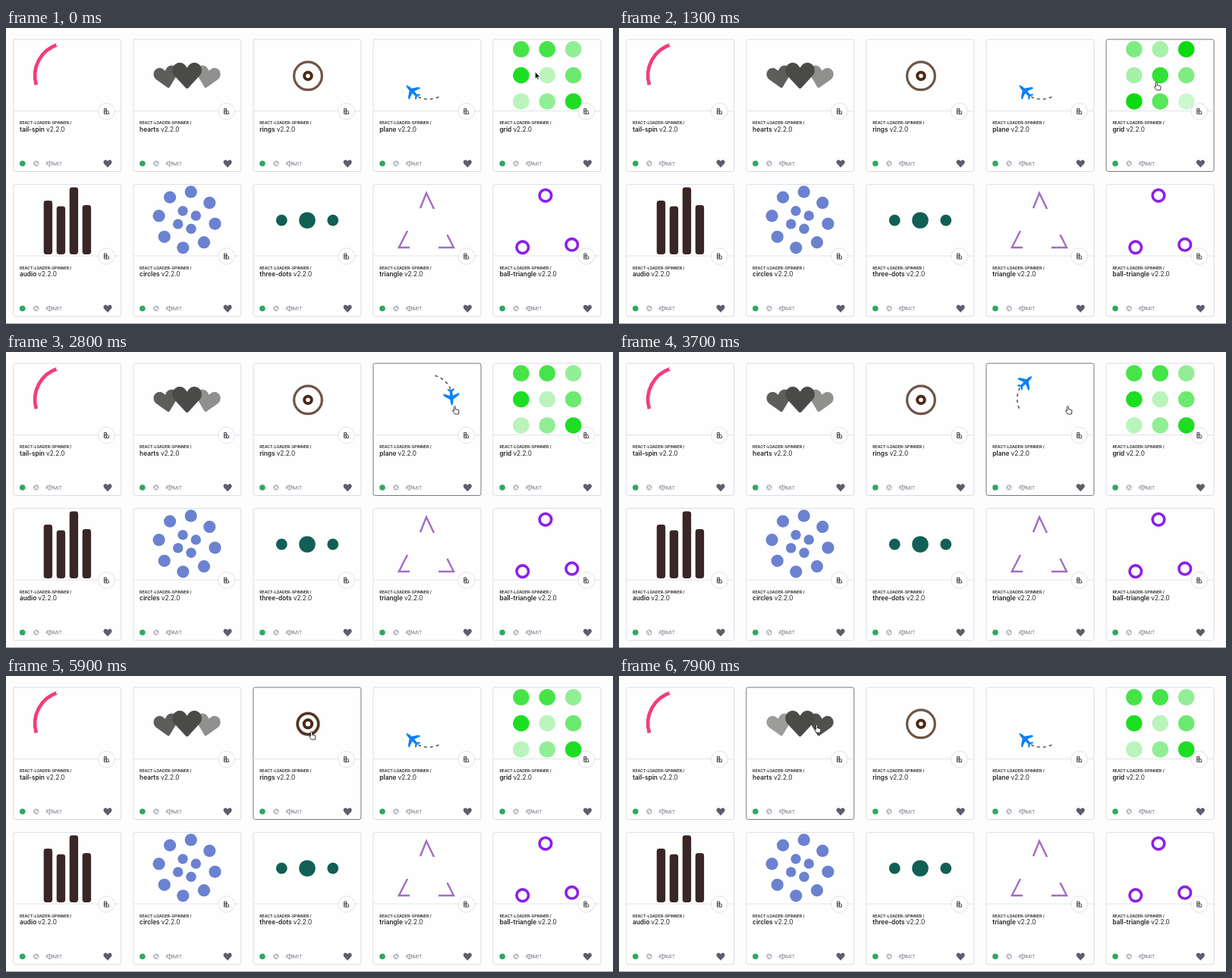
An HTML page for the animation above (8 s loop, 800 by 391 pixels).

```html
<!DOCTYPE html>
<html lang="en">
<head>
<meta charset="utf-8">
<title>Loader gallery</title>
<style>
html, body { margin: 0; width: 100%; height: 100%; overflow: hidden; background: #fdfdfd; }
svg { display: block; }
text { font-family: Inter, "Open Sans", sans-serif; fill: #25252b; }
.pkg { font-size: 5.2px; font-weight: 600; }
.name { font-size: 8.3px; font-weight: 600; }
.name tspan { font-weight: 400; }
.mit { font-size: 6.7px; fill: #7d7d8c; }
.frame { fill: #fefefe; stroke: #dcdce6; }
.hover .frame { stroke: #777783; }
.line { fill: none; stroke: #8b8b99; stroke-width: .8; }
</style>
</head>
<body>
<svg width="800" height="391" viewBox="0 0 800 391">
  <defs>
    <g id="info">
      <path d="M0 94.5H142" stroke="#e1e1ea"/>
      <circle cx="122.7" cy="95" r="10.8" fill="#fff" stroke="#e1e1ea"/>
      <path transform="translate(122.7 95)" fill="none" stroke="#35353c" stroke-width=".9"
        d="M-3 3.5V-3.5H0V3.5ZM0 -1.5L3 .5V3.5H0M-3 -1H0M-3 1H0"/>
      <text class="pkg" x="8.3" y="112">REACT-LOADER-SPINNER /</text>
      <circle cx="12" cy="164" r="3.8" fill="#2fa85f"/>
      <g class="line">
        <circle cx="30" cy="164" r="3.2"/>
        <path d="M27 163l2 1 1 2.8M30 161l1 2 2 .5"/>
        <path d="M47.7 160.5V167M45.5 167h4.4M44.5 161.8h6.4M44.5 162l-1.5 3h3zM50.9 162l-1.5 3h3z"/>
      </g>
      <text class="mit" x="52.2" y="166.6">MIT</text>
      <path fill="#5d5d6b" d="M124.3 169.3L119.7 164.6C116.7 161 121.5 157 124.3 161C127.1 157 131.9 161 128.9 164.6Z"/>
    </g>
    <path id="side" d="M30.262 57.02L7.195 40.723c-5.84-3.976-7.56-12.06-3.842-18.063 3.715-6 11.467-7.65 17.306-3.68l4.52 3.76 2.6-5.274c3.717-6.002 11.47-7.65 17.305-3.68 5.84 3.97 7.56 12.054 3.842 18.062L34.49 56.118c-.897 1.512-2.793 1.915-4.228.9z"/>
  </defs>

  <g id="cards"></g>

  <path d="M39.9 75.1A43 43 0 0 1 67.8 21.9" fill="none" stroke="#f23d7f" stroke-width="4.7"/>
  <circle cx="68.3" cy="21.8" r="2.4" fill="#fefefe"/>

  <g transform="translate(193.6 42) scale(.643)" fill="#4a4a48">
    <use href="#side" id="left"/>
    <use href="#side" id="right" transform="translate(140 0) scale(-1 1)"/>
    <path d="M67.408 57.834l-23.01-24.98c-5.864-6.15-5.864-16.108 0-22.248 5.86-6.14 15.37-6.14 21.234 0L70 16.168l4.368-5.562c5.863-6.14 15.375-6.14 21.235 0 5.863 6.14 5.863 16.098 0 22.247l-23.007 24.98c-1.43 1.556-3.757 1.556-5.188 0z"/>
  </g>

  <g transform="translate(398 63.3) scale(2)" fill="none" stroke="#4a2a17" stroke-width="2">
    <circle id="wave"/>
    <circle id="core"/>
  </g>

  <g id="plane">
    <path d="M-10.9 -30.1A32 32 0 0 0 -30.4 -9.9" fill="none" stroke="#5a5a5a" stroke-width="1.6" stroke-dasharray="4"/>
    <path transform="translate(0 -30.4) scale(.4)" fill="#0c82f3"
      d="M28 0Q22 -5 8 -5L-5 -24Q-8 -27 -13 -26L-5 -5L-18 -4L-24 -11H-29L-24 0L-29 11H-24L-18 4L-5 5L-13 26Q-8 27 -5 24L8 5Q22 5 28 0Z"/>
  </g>

  <g id="grid" fill="#0adb0f"></g>
  <g id="audio" fill="#392627"></g>
  <g id="circles" fill="#6b82d0"></g>

  <g fill="#125f55">
    <circle cx="363.3" cy="254" r="7.4"/>
    <circle cx="397" cy="254" r="10.8"/>
    <circle cx="430.8" cy="254" r="7.4"/>
  </g>

  <path fill="none" stroke="#a26cc4" stroke-width="2.4"
    d="M546 238L554 218L564 239M529 268L517.8 290H532M570 290H590L581.5 273"/>

  <g fill="none" stroke="#8c1fea" stroke-width="3.6">
    <circle cx="711" cy="221.3" r="7.8"/>
    <circle cx="680.8" cy="289.7" r="7.8"/>
    <circle cx="745.8" cy="286.2" r="7.8"/>
  </g>

  <path d="M0 390.5H800" stroke="#a2a2a4"/>

  <g id="cursor">
    <path id="arrow" transform="translate(-1.5 -5)" fill="#111" stroke="#fff" stroke-width=".5"
      d="M0 0V9L2 7.2L3.4 10.2L4.8 9.6L3.5 6.7H6.2Z"/>
    <path id="hand" fill="#fff" stroke="#222" stroke-width=".9"
      d="M-2.5 -4.5a1 1 0 0 1 2 0V-1.2L3 -.6Q4.2 -.3 4 1L3.4 5H-1.5L-4.3 1.2Q-4.6 -.2 -3.2 0L-2.5 .8Z"/>
  </g>
</svg>
<script>
const LOOP = 8000, STEP = 100, LEAD = 16;
const NAMES = ['tail-spin', 'hearts', 'rings', 'plane', 'grid',
  'audio', 'circles', 'three-dots', 'triangle', 'ball-triangle'];
const HEARTS = 1, RINGS = 2, PLANE = 3, GRID = 4;
const CARD_W = 142, PITCH = 158.1;

// When each live preview starts, and the loader time shown while idle (s).
const start = { [GRID]: 600, [PLANE]: 2467, [RINGS]: 4230, [HEARTS]: 6550 };
const idle = { [GRID]: 1.15, [PLANE]: .875, [RINGS]: 2.1, [HEARTS]: 1.95 };

// Cursor stops: time, x, y.
const stops = [
  [0, 699, 63], [200, 699, 63], [600, 710, 77], [2150, 710, 77], [2650, 593, 77],
  [3925, 593, 77], [4425, 404, 79], [6250, 404, 79], [6750, 262, 70], [LOOP, 262, 70]
];

const $ = id => document.getElementById(id);
const set = (el, attrs) => {
  for (const key in attrs) el.setAttribute(key, attrs[key]);
  return el;
};
const add = (parent, tag, attrs) =>
  parent.appendChild(set(document.createElementNS('http://www.w3.org/2000/svg', tag), attrs));
const mod = (a, n) => ((a % n) + n) % n;
const cardX = col => 9.7 + col * PITCH;

const cards = NAMES.map((name, i) => {
  const y = i < 5 ? 15 : 206.5;
  const card = add($('cards'), 'g', { transform: `translate(${cardX(i % 5)} ${y})` });
  add(card, 'rect', { class: 'frame', width: CARD_W, height: 174.5, rx: 2.5 });
  add(card, 'use', { href: '#info' });
  const label = add(card, 'text', { class: 'name', x: 8.3, y: 121.8 });
  label.textContent = name + ' ';
  add(label, 'tspan', {}).textContent = 'v2.2.0';
  return card;
});

// Delays of the grid dots, row by row (s).
const dots = [0, .3, .8, .1, .6, .4, .7, .5, .2].map((delay, i) => ({
  delay,
  el: add($('grid'), 'circle', { cx: 678.9 + i % 3 * 34.4, cy: 28.1 + Math.floor(i / 3) * 34.4, r: 10.75 })
}));

[228, 235.5, 210.5, 234].forEach((y, i) =>
  add($('audio'), 'rect', { x: 49.7 + i * 17, y, width: 11.4, height: 299 - y, rx: 3.4 }));

function wheel(count, radius, r, angle) {
  for (let i = 0; i < count; i++) {
    const a = (angle + i * 360 / count) * Math.PI / 180;
    add($('circles'), 'circle', { cx: 238.5 + radius * Math.cos(a), cy: 253.4 + radius * Math.sin(a), r });
  }
}
wheel(8, 37.3, 8.1, -82);
wheel(4, 13, 6.7, -115);

function cursorAt(t) {
  const i = stops.findIndex(s => s[0] > t);
  const [t0, x0, y0] = stops[i - 1], [t1, x1, y1] = stops[i];
  const p = (t - t0) / (t1 - t0), e = p * p * (3 - 2 * p);
  return [x0 + (x1 - x0) * e, y0 + (y1 - y0) * e];
}

function drawGrid(s) {
  for (const { el, delay } of dots) {
    const p = mod(s - delay, 1);
    set(el, { 'fill-opacity': s < delay ? 1 : .2 + 1.6 * Math.abs(p - .5) });
  }
}

function drawPlane(s) {
  set($('plane'), { transform: `translate(556.8 62) rotate(${s / 1.4 * 360})` });
}

function drawRings(s) {
  const k = mod(s, 1.5) / .25;
  set($('core'), { r: k < 1 ? 6 - 5 * k : k });
  const p = (s - 1.5) / 3;
  set($('wave'), p < 0 ? { r: 6, 'stroke-opacity': 0 }
    : { r: 6 + 16 * p, 'stroke-width': 2 * (1 - p), 'stroke-opacity': 1 - p });
}

function drawHearts(s) {
  const pulse = q => q < 0 ? .5 : 1 - Math.abs(mod(q, 1.4) / 1.4 - .5);
  set($('left'), { 'fill-opacity': pulse(s) });
  set($('right'), { 'fill-opacity': pulse(s - .7) });
}

const loaders = { [GRID]: drawGrid, [PLANE]: drawPlane, [RINGS]: drawRings, [HEARTS]: drawHearts };

function draw(t) {
  const [x, y] = cursorAt(t);
  const col = Math.floor((x - cardX(0)) / PITCH);
  const inside = t >= start[GRID] && x < cardX(col) + CARD_W;
  const active = inside ? col : -1;
  cards.forEach((card, i) => card.classList.toggle('hover', i === active));
  for (const i in loaders) {
    const live = +i === active && t >= start[i];
    loaders[i](live ? (t - start[i]) / 1000 : idle[i]);
  }
  set($('cursor'), { transform: `translate(${x} ${y})` });
  set($('arrow'), { visibility: inside ? 'hidden' : 'visible' });
  set($('hand'), { visibility: inside ? 'visible' : 'hidden' });
}

const origin = performance.now();
function tick() {
  const t = performance.now() - origin + LEAD;
  draw(Math.floor(t / STEP) * STEP % LOOP);
  requestAnimationFrame(tick);
}
tick();
</script>
</body>
</html>
```
